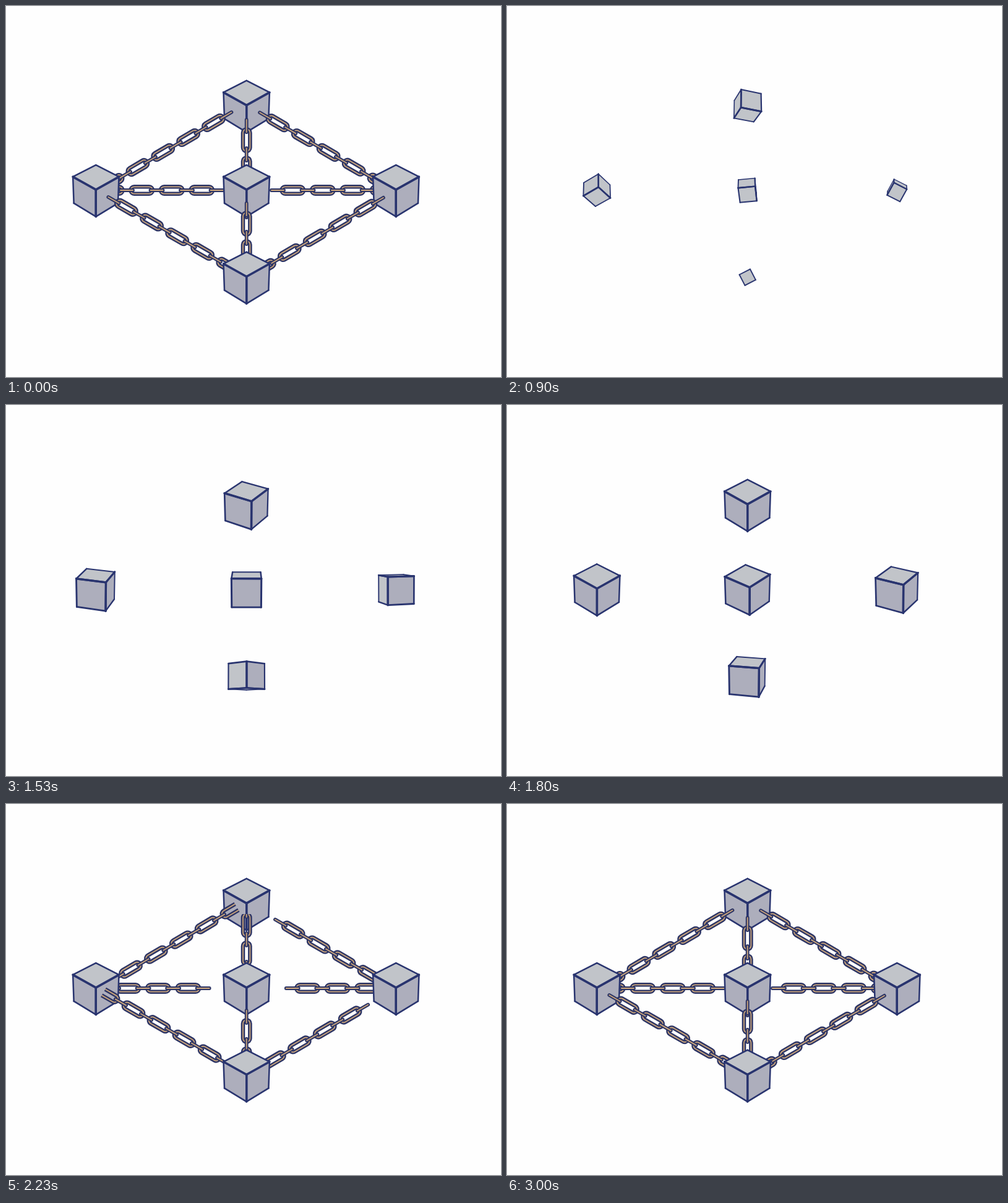
Write an HTML page with a canvas that moves like this. It is 800 px wide and 600 px high and loops after 3030 ms.

```html
<!DOCTYPE html>
<html lang="en">
<head>
<meta charset="utf-8">
<title>Linked cubes</title>
<style>
  html, body { margin: 0; width: 100%; height: 100%; overflow: hidden; background: #fefefe; }
  canvas { display: block; width: 800px; height: 600px; }
</style>
</head>
<body>
<canvas id="stage" width="800" height="600"></canvas>
<script>
const ctx = document.getElementById('stage').getContext('2d');
const LOOP = 3030, HOLD = 30;
const NAVY = '#29346f', LINK = '#2d3565', TAN = '#cba67c', LIGHT = '#c1c4c9', SHADE = '#adaebc';

const CUBE = { size: 51.5, yaw: 135, pitch: 34, yawTurn: 460, pitchTurn: 198, time: 1725, depth: 700 };
const CHAIN = { from: 1964, time: 364 };
const ROD = 26;

// x, y, delay
const cubes = {
  top:    [388.7, 161.5, 0],
  left:   [145.3, 298, 100],
  mid:    [388.7, 298, 200],
  right:  [630.3, 298, 300],
  bottom: [388.7, 438.7, 400]
};

// Final tip, direction of travel in degrees, travel, link spacing, flat links
const chains = {
  topLeft:     [140.4, 303.7, 149.5, 270, 47.4, 5],
  topMid:      [388.7, 345, 90, 167, 46, 3],
  rightTop:    [407.5, 170.7, 210.2, 227, 47.4, 5],
  leftMid:     [353.5, 298, 0, 172, 48.5, 5],
  rightMid:    [426, 298, 180, 187, 48.5, 5],
  leftBottom:  [390.5, 439, 30, 269, 47.4, 5],
  bottomRight: [612.5, 308.4, -30.4, 226, 47.4, 5],
  bottomMid:   [388.7, 316, -90, 118, 46, 3]
};

const layers = [
  ['top'], ['topLeft', 'topMid', 'rightTop', 'leftMid', 'rightMid'],
  ['left', 'mid', 'right'], ['leftBottom', 'bottomRight', 'bottomMid'], ['bottom']
].flat();

// Corners are bit patterns: 1 = +x, 2 = +y, 4 = +z
const faces = [
  { ids: [0, 1, 5, 4], fill: LIGHT },
  { ids: [2, 6, 7, 3], fill: LIGHT },
  { ids: [4, 5, 7, 6], fill: LIGHT },
  { ids: [0, 4, 6, 2], fill: LIGHT },
  { ids: [5, 1, 3, 7], fill: SHADE },
  { ids: [1, 0, 2, 3], fill: SHADE }
];

// Linear departure, soft arrival: cubic-bezier(1/6, 1/6, 2/3, 1)
function ease(x) {
  if (x <= 0) return 0;
  if (x >= 1) return 1;
  const curve = (u, a, b) => 3 * (1 - u) ** 2 * u * a + 3 * (1 - u) * u * u * b + u ** 3;
  let lo = 0, hi = 1;
  for (let i = 0; i < 24; i++) {
    const u = (lo + hi) / 2;
    if (curve(u, 1 / 6, 2 / 3) < x) lo = u; else hi = u;
  }
  return curve(lo, 1 / 6, 1);
}

function project(id, half, yaw, pitch) {
  const x = id & 1 ? half : -half, y = id & 2 ? half : -half, z = id & 4 ? half : -half;
  const x1 = x * Math.cos(yaw) - z * Math.sin(yaw);
  const z1 = x * Math.sin(yaw) + z * Math.cos(yaw);
  const y1 = y * Math.cos(pitch) - z1 * Math.sin(pitch);
  const z2 = y * Math.sin(pitch) + z1 * Math.cos(pitch);
  const k = CUBE.depth / (CUBE.depth - z2);
  return { x: x1 * k, y: -y1 * k, z: z2 };
}

// Positive for faces turned to the viewer
function area(pts) {
  return pts.reduce((sum, p, i) => {
    const q = pts[(i + 1) % pts.length];
    return sum + q.x * p.y - p.x * q.y;
  }, 0);
}

function drawCube([x, y, delay], t) {
  const p = ease((t - delay) / CUBE.time);
  if (!p) return;
  const rad = Math.PI / 180, size = CUBE.size * p;
  const yaw = (CUBE.yaw - CUBE.yawTurn * (1 - p)) * rad;
  const pitch = (CUBE.pitch - CUBE.pitchTurn * (1 - p)) * rad;
  const corners = [...Array(8).keys()].map(id => project(id, size / 2, yaw, pitch));
  const shown = faces
    .map(f => ({ fill: f.fill, pts: f.ids.map(id => corners[id]) }))
    .filter(f => area(f.pts) > 0);
  const base = 0.8 + 1.7 * p;

  ctx.save();
  ctx.translate(x, y);
  ctx.lineCap = 'round';
  for (const { fill, pts } of shown) {
    ctx.beginPath();
    pts.forEach(q => ctx.lineTo(q.x, q.y));
    ctx.closePath();
    ctx.fillStyle = fill;
    ctx.fill();
  }
  ctx.strokeStyle = NAVY;
  for (const { pts } of shown) {
    pts.forEach((a, i) => {
      const b = pts[(i + 1) % 4];
      ctx.lineWidth = base * (1 + 0.3 * (a.z + b.z) / size);
      ctx.beginPath();
      ctx.moveTo(a.x, a.y);
      ctx.lineTo(b.x, b.y);
      ctx.stroke();
    });
  }
  ctx.restore();
}

function strokeLink(width) {
  ctx.strokeStyle = LINK;
  ctx.lineWidth = width;
  ctx.stroke();
  ctx.strokeStyle = TAN;
  ctx.lineWidth = 1.8;
  ctx.stroke();
}

function flatLink(x) {
  ctx.beginPath();
  ctx.roundRect(x - 17.8, -5.7, 35.6, 11.4, 5.7);
  strokeLink(6.6);
}

function rod(x) {
  const half = ROD / 2 - 3;
  ctx.beginPath();
  ctx.moveTo(x - half, 0);
  ctx.lineTo(x + half, 0);
  strokeLink(5.8);
}

function drawChain([x, y, angle, travel, gap, count], t) {
  const p = ease((t - CHAIN.from) / CHAIN.time);
  if (!p) return;
  ctx.save();
  ctx.translate(x, y);
  ctx.rotate(angle * Math.PI / 180);
  ctx.translate(-travel, 0);
  ctx.beginPath();
  ctx.rect(0, -20, travel + 10, 40);
  ctx.clip();
  ctx.lineCap = 'round';
  const head = travel * p - ROD / 2;
  for (let i = 0; i < count; i++) flatLink(head - gap * (i + 0.5));
  for (let i = 0; i <= count; i++) rod(head - gap * i);
  ctx.restore();
}

function draw(t) {
  if (t < HOLD) t = LOOP;
  ctx.fillStyle = '#fefefe';
  ctx.fillRect(0, 0, 800, 600);
  for (const name of layers) {
    if (cubes[name]) drawCube(cubes[name], t);
    else drawChain(chains[name], t);
  }
}

const start = performance.now();
function tick() {
  draw((performance.now() - start) % LOOP);
  requestAnimationFrame(tick);
}
tick();
</script>
</body>
</html>
```
